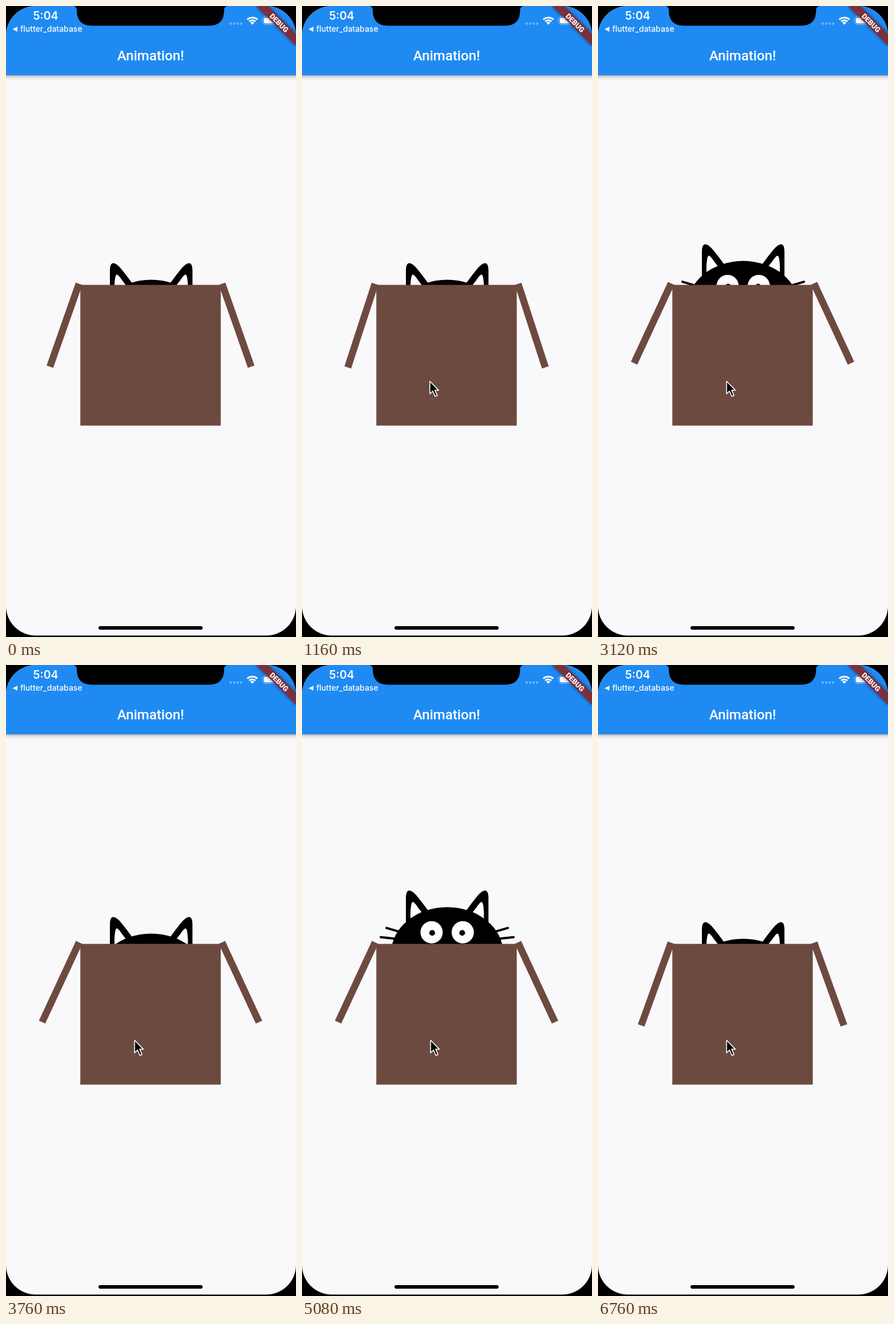
Animation of 508 by 1103 pixels, one loop 6.8 s. Source, as an HTML page:

```html
<!DOCTYPE html>
<html lang="en">
<head>
<meta charset="utf-8">
<title>Animation!</title>
<style>
  html, body { margin: 0; width: 100%; height: 100%; overflow: hidden; background: #000; }
  svg { display: block; width: 100vw; height: 100vh; }
  .ui { font-family: Inter, "Open Sans", sans-serif; fill: #fff; }
  .title { font: 500 24.2px Roboto, sans-serif; fill: #fff; }
  .banner { font: 900 12.6px Roboto, sans-serif; fill: #fff; }
</style>
</head>
<body>
<svg viewBox="0 0 508 1103" preserveAspectRatio="none">
  <defs>
    <clipPath id="screen"><rect width="508" height="1100.5" rx="52"/></clipPath>
    <linearGradient id="barShadow" x2="0" y2="1">
      <stop stop-color="#000" stop-opacity=".3"/>
      <stop offset=".4" stop-color="#000" stop-opacity=".1"/>
      <stop offset="1" stop-color="#000" stop-opacity="0"/>
    </linearGradient>
    <filter id="blur" x="-30%" y="-80%" width="160%" height="260%"><feGaussianBlur stdDeviation="3"/></filter>
    <g id="catSide">
      <path d="M182 522V463Q182 449.500 188 449.500Q194 449.500 203 461Q212 472 222 486V522Z"/>
      <path d="M190 510V487Q191 469.500 194 469.500Q197 469.500 203 479L214 493V510Z" fill="#fff"/>
      <path d="M148 515L172 522M138 531L166 534M146 549L168 546" stroke="#000" stroke-width="4" stroke-linecap="round"/>
    </g>
    <g id="catEye">
      <circle cx="227" cy="522.500" r="19.500" fill="#fff"/>
      <circle cx="228" cy="523.500" r="5"/>
    </g>
    <rect id="flap" width="153.750" height="12.300" fill="#6d4a40"/>
  </defs>

  <g clip-path="url(#screen)">
    <rect width="508" height="1103" fill="#f9f8fb"/>
    <rect y="121" width="508" height="9" fill="url(#barShadow)"/>
    <rect width="508" height="121" fill="#1f8af2"/>

    <g id="cat">
      <use href="#catSide"/>
      <use href="#catSide" transform="translate(508.600) scale(-1 1)"/>
      <ellipse cx="254.300" cy="558.500" rx="98" ry="80"/>
      <use href="#catEye"/>
      <use href="#catEye" transform="translate(508.600) scale(-1 1)"/>
      <path d="M248 549H261L254.500 556Z" fill="#fff"/>
    </g>
    <rect x="130.200" y="487.500" width="246" height="246" fill="#6d4a40"/>
    <use id="left" href="#flap"/>
    <g transform="translate(506.400) scale(-1 1)"><use id="right" href="#flap"/></g>

    <text class="title" x="253.300" y="95" text-anchor="middle">Animation!</text>
    <text class="ui" x="47.500" y="23.700" font-size="19.500" font-weight="600">5:04</text>
    <path d="M11.500 40.500L20 36.200V44.800Z" fill="#fff"/>
    <text class="ui" x="25" y="45" font-size="14" font-weight="500">flutter_database</text>

    <g fill="#fff" fill-opacity=".35">
      <circle cx="393.500" cy="30.800" r="2.200"/><circle cx="399.700" cy="30.800" r="2.200"/>
      <circle cx="405.700" cy="30.800" r="2.200"/><circle cx="411.700" cy="30.800" r="2.200"/>
    </g>
    <g fill="none" stroke="#fff" stroke-width="3">
      <path d="M422.700 23.800A12.500 12.500 0 0 1 440.300 23.800M426 27.300A7.800 7.800 0 0 1 437 27.300"/>
      <path d="M431.500 32.800L428 29.200A5 5 0 0 1 435 29.200Z" fill="#fff" stroke="none"/>
    </g>
    <rect x="449.700" y="18.500" width="28.500" height="14" rx="4.500" fill="none" stroke="#fff" stroke-opacity=".5"/>
    <rect x="451.700" y="20.500" width="24.500" height="10" rx="2.800" fill="#fff"/>

    <rect x="162" y="1084" width="182.500" height="6.200" rx="3.100"/>
  </g>

  <path d="M117 0Q124 0 124 8Q124 34.500 151 34.500H355Q382 34.500 382 8Q382 0 389 0Z"/>
  <g transform="translate(508 0) rotate(45)">
    <rect x="-49.200" y="34.400" width="98.400" height="14.800" opacity=".5" filter="url(#blur)"/>
    <rect x="-49.200" y="34.400" width="98.400" height="14.800" fill="#7a2f3d"/>
    <text class="banner" y="46.300" text-anchor="middle">DEBUG</text>
  </g>

  <path id="cursor" d="M0 0V22L5 17.200L9.300 26.500L13 24.800L8.700 15.600H15.300Z"
    stroke="#fff" stroke-width="1.600" stroke-linejoin="round"/>
</svg>
<script>
const LOOP = 6800, STEP = 40, SWING = 306, LIFT = 55.3;
// Flap swings: start, stop, phase at the start (1 = one way)
const swings = [[0, 2160, .27], [3430, 3633, .665], [4460, 4663, .665], [6254, LOOP, .665]];
// Cat peeks: rise start, fall start
const peeks = [[2160, 3039], [3633, 4068], [4663, 5862]];
const RISE = 370, FALL = 300;

const el = id => document.getElementById(id);
const clamp = x => Math.min(1, Math.max(0, x));

function bezier(x1, y1, x2, y2) {
  const at = (a, b, u) => 3 * a * u * (1 - u) ** 2 + 3 * b * u * u * (1 - u) + u ** 3;
  return x => {
    let lo = 0, hi = 1;
    for (let i = 0; i < 24; i++) {
      const mid = (lo + hi) / 2;
      if (at(x1, x2, mid) < x) lo = mid; else hi = mid;
    }
    return at(y1, y2, (lo + hi) / 2);
  };
}
const easeIn = bezier(.42, 0, 1, 1);
const easeInOut = bezier(.42, 0, .58, 1);

function flapAngle(t) {
  const [start, stop, phase] = swings.filter(s => s[0] <= t).pop();
  const p = (phase + (Math.min(t, stop) - start) / SWING) % 2;
  return 108 + 9 * easeInOut(p > 1 ? 2 - p : p);
}

function catLift(t) {
  const peek = peeks.filter(p => p[0] <= t).pop();
  if (!peek) return 0;
  const [up, down] = peek;
  return LIFT * easeIn(t < down ? clamp((t - up) / RISE) : 1 - clamp((t - down) / FALL));
}

function draw(t) {
  const turn = `translate(133.7 487.5) rotate(${flapAngle(t)})`;
  el('left').setAttribute('transform', turn);
  el('right').setAttribute('transform', turn);
  el('cat').setAttribute('transform', `translate(0 ${-catLift(t)})`);

  const away = (1 - clamp((t - 440) / 360)) ** 2;
  const x = (t < 2160 ? 224 : 225.3) + 26 * away;
  el('cursor').setAttribute('transform', `translate(${x} ${656 + 452 * away})`);
}

const begin = performance.now();
function tick() {
  const t = (performance.now() - begin) % LOOP;
  draw(Math.floor(t / STEP) * STEP);
  requestAnimationFrame(tick);
}
draw(0);
requestAnimationFrame(tick);
</script>
</body>
</html>
```
